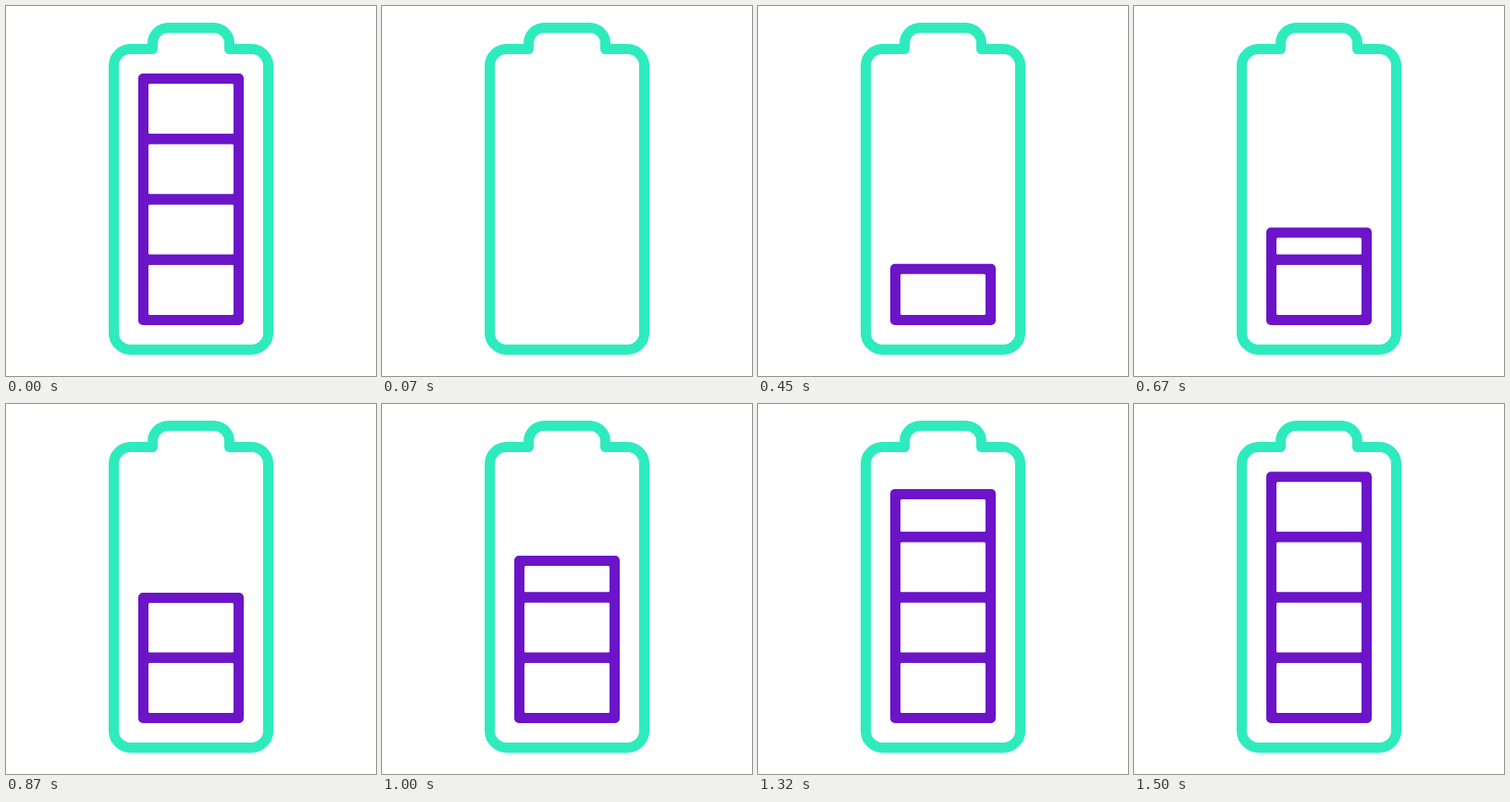
An HTML page with a canvas that plays this animation: 400 px wide and 400 px high, repeating every 1520 ms.

```html
<!DOCTYPE html>
<html lang="en">
<head>
<meta charset="utf-8">
<title>Charging battery</title>
<style>
  html, body { margin: 0; width: 100%; height: 100%; overflow: hidden; background: #fff; }
  canvas { display: block; }
</style>
</head>
<body>
<canvas id="stage" width="400" height="400"></canvas>
<script>
const ctx = document.getElementById('stage').getContext('2d');

const LOOP = 1520;
const TICK = 25;
const PHASE = 305;
const FADE = 75;
const STROKE = 11;
const CELL = { left: 148.5, right: 251.5, bottom: 339.5, pitch: 65.25, count: 4 };
const TEAL = '#2eebbd';
const PURPLE = '#6b14c8';

const clamp = v => Math.min(1, Math.max(0, v));

// Cubic Bezier easing with control points (.25, 0) and (.035, 1).
function ease(x) {
  let low = 0, high = 1;
  for (let i = 0; i < 24; i++) {
    const t = (low + high) / 2, u = 1 - t;
    const bx = 3 * u * u * t * 0.25 + 3 * u * t * t * 0.035 + t * t * t;
    if (bx < x) low = t; else high = t;
  }
  return low * low * (3 - 2 * low);
}

function drawCase() {
  ctx.strokeStyle = TEAL;
  ctx.lineWidth = STROKE;
  ctx.lineJoin = 'round';
  ctx.beginPath();
  ctx.moveTo(158.5, 46.5);
  ctx.arcTo(158.5, 23.5, 200, 23.5, 17);
  ctx.arcTo(241.5, 23.5, 241.5, 46.5, 17);
  ctx.lineTo(241.5, 46.5);
  ctx.arcTo(283.5, 46.5, 283.5, 200, 18);
  ctx.arcTo(283.5, 371.5, 200, 371.5, 18);
  ctx.arcTo(116.5, 371.5, 116.5, 200, 18);
  ctx.arcTo(116.5, 46.5, 158.5, 46.5, 18);
  ctx.closePath();
  ctx.stroke();
}

function drawCell(bottom, height) {
  const half = STROKE / 2;
  const width = CELL.right - CELL.left;
  const top = bottom - height;
  ctx.fillStyle = PURPLE;
  ctx.beginPath();
  ctx.roundRect(CELL.left - half, top - half, width + STROKE, height + STROKE, 5);
  if (height > STROKE) {
    ctx.roundRect(CELL.left + half, top + half, width - STROKE, height - STROKE, 1.5);
  }
  ctx.fill('evenodd');
}

function drawCells(time) {
  const draining = time < PHASE;
  for (let i = 0; i < CELL.count; i++) {
    const progress = draining ? 1 : clamp(time / PHASE - 1 - i);
    if (progress > 0) drawCell(CELL.bottom - i * CELL.pitch, CELL.pitch * ease(progress));
  }
  if (draining) {
    ctx.fillStyle = `rgba(255, 255, 255, ${clamp(time / FADE)})`;
    ctx.fillRect(130, 60, 140, 298);
  }
}

function render(now) {
  // Steps of 25 ms on a clock that counts hundredths of a second.
  const clock = Math.floor((now % LOOP) / 10) * 10;
  const time = Math.floor((clock + 5) / TICK) * TICK;
  ctx.fillStyle = '#fff';
  ctx.fillRect(0, 0, 400, 400);
  drawCells(time);
  drawCase();
}

let start;
function loop(now) {
  start ??= now;
  render(now - start);
  requestAnimationFrame(loop);
}
render(0);
requestAnimationFrame(loop);
</script>
</body>
</html>
```
